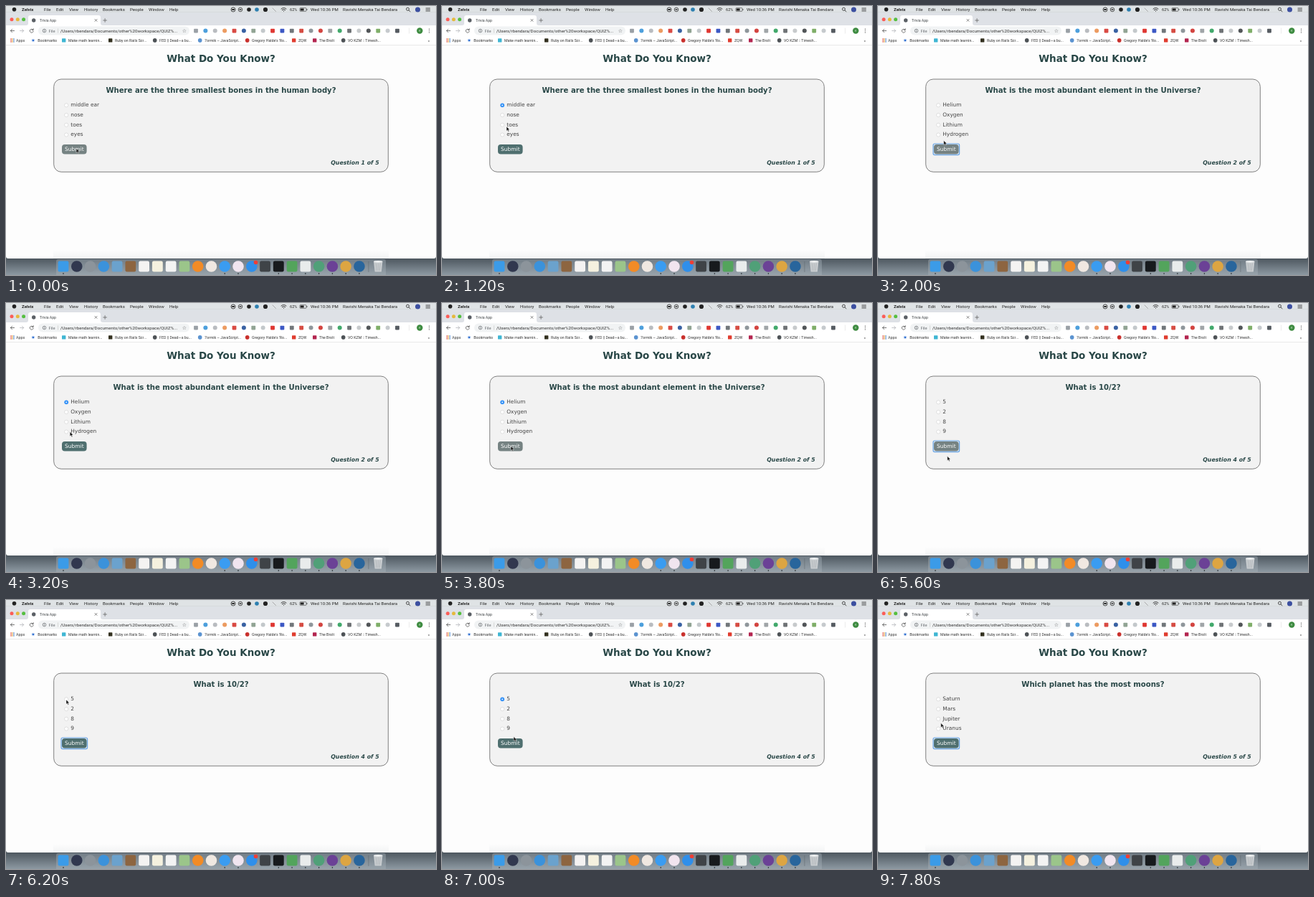
An HTML page for the animation above (8000 ms loop, 600 px wide and 375 px high).

```html
<!DOCTYPE html>
<html lang="en">
<head>
<meta charset="utf-8">
<title>Trivia App</title>
<style>
  html, body { margin: 0; width: 100%; height: 100%; overflow: hidden; background: #fdfdfd; }
  svg { display: block; width: 100vw; height: 100vh; }
  text { white-space: pre; }
  .ui { font-family: Roboto, "Open Sans", sans-serif; }
  .page { font-family: Verdana, "DejaVu Sans", sans-serif; }
</style>
</head>
<body>
<svg viewBox="0 0 600 375">
  <defs>
    <linearGradient id="wallpaper" x2="0" y2="1">
      <stop stop-color="#3a434b"/><stop offset="1" stop-color="#8d99a2"/>
    </linearGradient>
    <linearGradient id="shelf" x2="0" y2="1">
      <stop stop-color="#727d86"/><stop offset="1" stop-color="#98a3ab"/>
    </linearGradient>
    <linearGradient id="haze" x2="0" y2="1">
      <stop stop-color="#fdfdfd"/><stop offset="1" stop-color="#f2f3f4"/>
    </linearGradient>
  </defs>
  <g id="desktop" class="ui"></g>
  <g id="quiz" class="page"></g>
  <path id="cursor" d="M0 0V6.2L1.5 4.9L2.5 7.2L3.6 6.7L2.6 4.5H4.5Z" fill="#111" stroke="#fff" stroke-width=".45"/>
</svg>
<script>
const LOOP = 8000, STEP = 200;
const byId = id => document.getElementById(id);

const rect = (x, y, w, h, fill, r = 0, extra = '') =>
  `<rect x="${x}" y="${y}" width="${w}" height="${h}" rx="${r}" fill="${fill}" ${extra}/>`;
const circle = (x, y, r, fill, extra = '') =>
  `<circle cx="${x}" cy="${y}" r="${r}" fill="${fill}" ${extra}/>`;
const text = (x, y, size, fill, str, extra = '') =>
  `<text x="${x}" y="${y}" font-size="${size}" fill="${fill}" ${extra}>${str}</text>`;
const line = (d, color, width = .8) =>
  `<path d="${d}" fill="none" stroke="${color}" stroke-width="${width}" stroke-linecap="round" stroke-linejoin="round"/>`;
const BOLD = 'font-weight="700"';
const MIDDLE = 'text-anchor="middle"';

function menuBar() {
  const menus = [[53, 'File'], [70, 'Edit'], [88, 'View'], [109, 'History'],
    [135, 'Bookmarks'], [173, 'People'], [199, 'Window'], [228, 'Help']];
  return rect(0, 0, 600, 9.2, '#dfe3e5')
    + rect(0, 8.8, 600, .6, '#b3b8bc')
    + circle(11.5, 4.7, 2.8, '#222')
    + text(22, 7, 6.1, '#222', 'Zelvix', BOLD)
    + menus.map(([x, label]) => text(x, 7, 6.1, '#222', label)).join('')
    + circle(317, 5, 3, 'none', 'stroke="#222" stroke-width=".8"') + rect(315.3, 4, 3.4, 2, '#222')
    + circle(327, 5, 2.8, 'none', 'stroke="#333" stroke-width=".8"') + rect(325.6, 4.2, 2.8, 1.6, '#333')
    + circle(339, 5, 2.8, '#222')
    + circle(350, 5, 2.8, '#2d7fb0')
    + circle(362, 5, 3.1, '#222')
    + line('M372 3L376.5 7.5', '#999')
    + line('M384 4Q387.5 1 391 4M385.3 5.6Q387.5 3.8 389.7 5.6M387.5 7.2v.1', '#222', .9)
    + text(396, 7, 5.6, '#222', '62%')
    + rect(410, 2.7, 9, 4.6, 'none', .8, 'stroke="#333" stroke-width=".6"')
    + rect(410.8, 3.5, 4.8, 3, '#222') + rect(419.5, 4, .8, 2, '#333')
    + text(425, 7, 6, '#222', 'Wed 10:36 PM')
    + text(470, 7, 6.1, '#222', 'Ravishi Menaka Tai Bendara')
    + circle(560.5, 4.3, 2, 'none', 'stroke="#222" stroke-width=".8"') + line('M562 5.9L564 7.8', '#222')
    + circle(574.5, 5, 3.5, '#3c4fa0')
    + line('M586 3h5.5M586 5h5.5M586 7h5.5', '#333');
}

function tabStrip() {
  const lights = ['#fb5d57', '#e6b93c', '#55bf40'];
  return rect(0, 9.2, 600, 17.8, '#dee1e6')
    + lights.map((c, i) => circle(8 + i * 8.3, 18.8, 2.5, c)).join('')
    + '<path d="M28 27Q31 27 31 24V16Q31 13 34 13H129Q132 13 132 16V24Q132 27 135 27Z" fill="#fff"/>'
    + circle(38.7, 20, 2.7, '#5b6065')
    + text(47, 22, 5.2, '#3c4043', 'Trivia App')
    + line('M124 18.4L127 21.4M127 18.4L124 21.4', '#555', .7)
    + line('M135.7 20H140.5M138.1 17.6V22.4', '#555', .7);
}

function toolbar() {
  // [colour, round]
  const icons = [
    ['#9aa0a6', 0], ['#4d9fdc', 1], ['#b9bcc0', 1], ['#ec9b61', 1], ['#d94a43', 0], ['#3a62a3', 1],
    ['#91a494', 0], ['#c3c8cb', 1], ['#df3732', 0], ['#3c58c4', 0], ['#72777b', 0], ['#d64c43', 0],
    ['#8f969b', 1], ['#d34440', 1], ['#a0a5a8', 0], ['#42a96c', 1], ['#6f7376', 0], ['#c7cacc', 1],
    ['#515558', 1], ['#7fae68', 0], ['#c6cacd', 1], ['#555b61', 0]];
  return rect(0, 27, 600, 15, '#fff')
    + line('M11.5 34.5H6.3M8.6 32.2L6.3 34.5L8.6 36.8', '#555')
    + line('M19.5 34.5H24.7M22.4 32.2L24.7 34.5L22.4 36.8', '#b5b8bb')
    + line('M37.8 33.2A2.5 2.5 0 1 0 38.2 35.3M38.2 31.6V33.6H36.2', '#555')
    + rect(45, 28.5, 211, 12, '#f1f3f4', 6)
    + circle(53.5, 34.5, 2.3, 'none', 'stroke="#5f6368" stroke-width=".7"')
    + line('M53.5 34.2V35.6M53.5 33.2v.1', '#5f6368', .6)
    + text(59.5, 36.6, 5.8, '#6b6f73', 'File')
    + line('M72.5 31.8V37.2', '#bbb', .5)
    + text(75.7, 36.6, 6.2, '#333', '/Users/rbendara/Documents/other%20workspace/QUIZ%...')
    + text(249, 36.9, 7, '#555', '☆', MIDDLE)
    + icons.map(([c, round], i) => {
        const x = 265 + i * 13.38;
        return round ? circle(x, 34.6, 3, c) : rect(x - 2.9, 31.8, 5.8, 5.6, c, .8);
      }).join('')
    + line('M562.5 31V38', '#ddd', .6)
    + circle(577.3, 34.5, 4.2, '#3d8b40') + text(577.3, 36, 4, '#cfe6cf', 'R', MIDDLE)
    + line('M590.5 32.2v.1M590.5 34.5v.1M590.5 36.8v.1', '#555', 1.2);
}

function bookmarksBar() {
  // [x, label, colour, round]
  const links = [
    [87, 'Make math learnin...', '#3fb6d3'], [152, 'Ruby on Rails Scr...', '#33301f'],
    [214, 'FED || Dead—a bu...', '#4d5256', 1], [277, '7ormik – JavaScript...', '#5b93d0', 1],
    [343, "Gregory Halde's 'Ro...", '#c9302c', 1], [408, 'ZQW', '#e03c2f'],
    [437, 'The Brolt', '#b3254f'], [477, 'VO KZM :: Timesh...', '#4d5256', 1]];
  const dots = ['#df5146', '#e6a73b', '#4a8ad8'];
  let grid = '';
  for (let i = 0; i < 9; i++)
    grid += rect(6.3 + i % 3 * 2, 45.2 + Math.floor(i / 3) * 2, 1.4, 1.4, dots[i % 3]);
  return rect(0, 42, 600, 12.5, '#fff') + grid
    + text(14, 49.8, 5.3, '#333', 'Apps')
    + text(38, 50.2, 6.5, '#2f6fd0', '★', MIDDLE)
    + text(44.3, 49.8, 5.3, '#333', 'Bookmarks')
    + links.map(([x, label, c, round]) =>
        (round ? circle(x - 6.3, 47.9, 2.8, c) : rect(x - 9, 45.2, 5.4, 5.4, c, .7))
        + text(x, 49.8, 5.25, '#333', label)).join('')
    + text(588.5, 49.8, 6, '#555', '»')
    + rect(0, 54.2, 600, .6, '#dcdcdc');
}

function dock() {
  // [colour, round, running]
  const apps = [
    ['#3b9be8', 0, 1], ['#31384f', 1], ['#8c949b', 1], ['#3b92db', 1], ['#6ba2cd', 0], ['#8d6540', 0],
    ['#f4f3f2', 0], ['#f5f1df', 0], ['#f3f3f3', 0], ['#9bc58a', 0], ['#f28b26', 1], ['#f0e8e1', 1],
    ['#3a9cf1', 1, 1], ['#f1e5ef', 1, 1], ['#2f8fea', 1], ['#3f4347', 0], ['#171a1d', 0, 1],
    ['#53a45c', 0, 1], ['#e9ecec', 0, 1], ['#50a078', 1, 1], ['#6b4196', 1, 1], ['#dda542', 1, 1], ['#28659c', 1, 1]];
  return rect(0, 345, 600, 30, 'url(#wallpaper)')
    + '<path d="M0 54.8H600V349Q600 352 597 352H3Q0 352 0 349Z" fill="#fdfdfd"/>'
    + rect(66, 340, 468, 12, 'url(#haze)')
    + '<path d="M70 375V356Q70 353 73 353H527Q530 353 530 356V375Z" fill="url(#shelf)"/>'
    + apps.map(([c, round, running], i) => {
        const x = 80 + i * 18.77;
        return (round ? circle(x, 363, 7.8, c) : rect(x - 7.4, 355.6, 14.8, 14.8, c, 2.2))
          + (running ? circle(x, 373, .8, '#121518') : '');
      }).join('')
    + circle(348.5, 357.5, 2.8, '#ee3e36')
    + rect(505.7, 356, .5, 15, '#59636b')
    + '<path d="M513 356H525.5L523.8 370.5H514.7Z" fill="#c9cdd0"/>'
    + '<ellipse cx="519.2" cy="356.3" rx="6.3" ry="1.4" fill="#eef0f1"/>'
    + line('M516.3 359L517 368.5M519.2 359V368.5M522.1 359L521.4 368.5', '#a3a9ae', .6);
}

// start: appears, chosen: first option picked, ringEnd: focus ring goes, hover: spans with the pointer on Submit
const questions = [
  { start: 0, chosen: 800, title: ['Where are the three smallest bones in the human body?'],
    options: ['middle ear', 'nose', 'toes', 'eyes'], ringEnd: 0, hover: [[0, 200], [1400, 1600]] },
  { start: 1600, chosen: 2600, title: ['What is the most abundant element in the Universe?'],
    options: ['Helium', 'Oxygen', 'Lithium', 'Hydrogen'], ringEnd: 2600, hover: [[1600, 2200], [3600, 4000]] },
  { start: 4000, chosen: 4800, title: ["Approximately how long does it take for light to travel from the Sun's surface", 'to the Earth?'],
    options: ['8 days', '8 seconds', '8 minutes', '8 hours'], ringEnd: 4800, hover: [[4000, 4200], [5200, 5400]] },
  { start: 5400, chosen: 6400, title: ['What is 10/2?'],
    options: ['5', '2', '8', '9'], ringEnd: 6400, hover: [[5400, 5800], [7200, 7400]] },
  { start: 7400, chosen: LOOP, title: ['Which planet has the most moons?'],
    options: ['Saturn', 'Mars', 'Jupiter', 'Uranus'], ringEnd: LOOP, hover: [[7400, 7600]] }];

function radio(y, checked) {
  return checked
    ? circle(84.2, y, 2.9, '#3592f7') + circle(84.2, y, .9, '#fff')
    : circle(84.2, y, 2.6, '#fff', 'stroke="#c4c4c4" stroke-width=".5"');
}

function quiz(time) {
  const index = questions.findLastIndex(q => q.start <= time);
  const q = questions[index];
  const shift = (q.title.length - 1) * 12;
  const hovered = q.hover.some(([from, to]) => time >= from && time < to);
  return text(300, 77.6, 13.5, '#294747', 'What Do You Know?', `${BOLD} ${MIDDLE}`)
    + rect(66.7, 102, 466.6, 129.3 + shift, '#f2f2f2', 10.4, 'stroke="#808080" stroke-width="1"')
    + q.title.map((s, i) => text(300, 121 + i * 12, 10.1, '#294747', s, `${BOLD} ${MIDDLE}`)).join('')
    + q.options.map((s, i) => {
        const y = 138.3 + shift + i * 13.75;
        return radio(y, i === 0 && time >= q.chosen) + text(90.3, y + 1.7, 7.4, '#444', s);
      }).join('')
    + (time < q.ringEnd ? rect(77, 192 + shift, 36.6, 15.6, '#dbe8f6', 2, 'stroke="#6ba5e4" stroke-width="1.2"') : '')
    + rect(78, 193 + shift, 34.6, 13.6, hovered ? '#758282' : '#4f6f6f', 4)
    + text(95.3, 202.4 + shift, 7.5, '#fff', 'Submit', MIDDLE)
    + text(520.7, 220.8 + shift, 7.85, '#294747', `Question ${index + 1} of 5`, `${BOLD} font-style="italic" text-anchor="end"`);
}

// Pointer path: [time, x, y]
const pointer = [
  [0, 98, 198.5], [200, 96, 190], [600, 84, 139], [1000, 84, 138], [1400, 96, 198], [1800, 96, 198],
  [2000, 91.7, 187.5], [2400, 84, 139], [2800, 84, 138], [3200, 89.2, 179.5], [3600, 96, 199],
  [4000, 96, 200], [4600, 82, 150], [4800, 82, 149.3], [5200, 96.5, 211], [5400, 96.5, 213],
  [5600, 96.7, 213.5], [6200, 84, 139], [6600, 84, 138], [7000, 100, 190.5], [7200, 98, 198],
  [7400, 97, 198], [7800, 87.7, 171.5], [LOOP, 87.7, 171.5]];

function pointerAt(time) {
  const next = pointer.findIndex(([t]) => t > time);
  const [t0, x0, y0] = pointer[next - 1], [t1, x1, y1] = pointer[next];
  const k = (time - t0) / (t1 - t0);
  return [x0 + (x1 - x0) * k, y0 + (y1 - y0) * k];
}

let shown = -1;
function draw() {
  const time = Math.floor(performance.now() % LOOP / STEP) * STEP;
  if (time !== shown) {
    shown = time;
    byId('quiz').innerHTML = quiz(time);
    byId('cursor').setAttribute('transform', `translate(${pointerAt(time)})`);
  }
  requestAnimationFrame(draw);
}

byId('desktop').innerHTML = dock() + menuBar() + tabStrip() + toolbar() + bookmarksBar();
draw();
</script>
</body>
</html>
```
